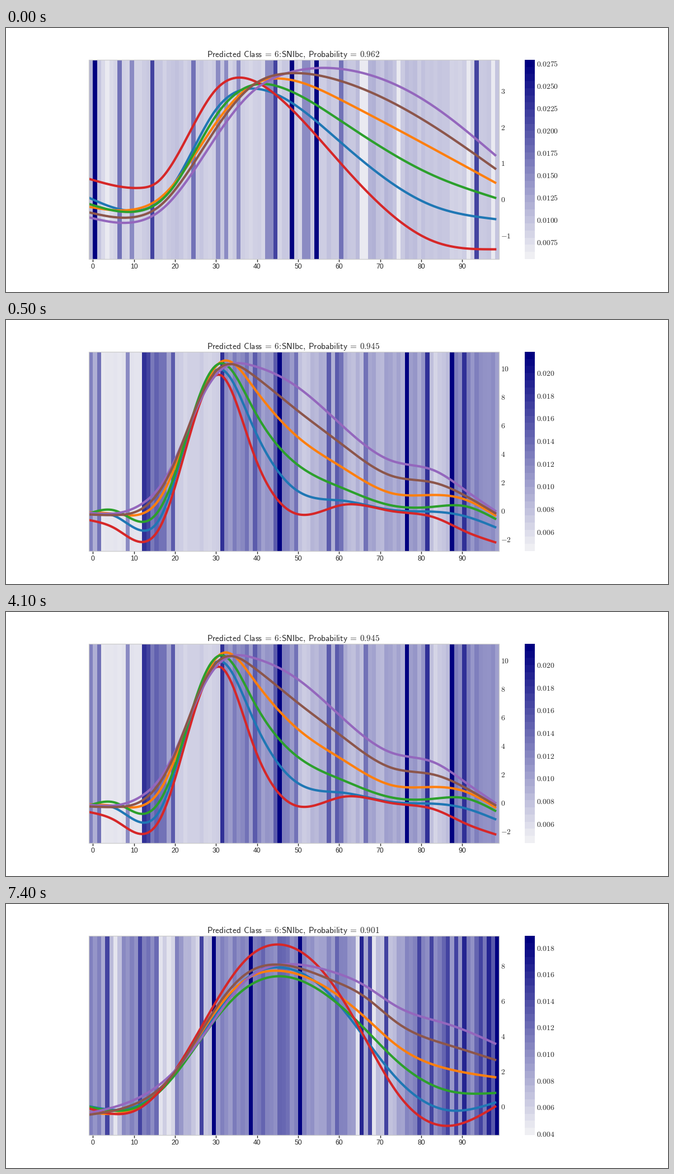
Recreate the animation shown at these times as a matplotlib script. Size 1183x473 px, loop 8000 ms.

```python
import matplotlib.pyplot as plt
import numpy as np
from matplotlib.animation import FuncAnimation
from matplotlib.colors import LinearSegmentedColormap
from matplotlib.patches import Rectangle

W, H, DPI = 1183, 473, 128
PT = 72 / DPI  # points per pixel
LEFT, RIGHT, TOP, BOTTOM = 147.9, 881.4, 56.8, 413.9
BAR_LEFT, BAR_RIGHT = 927.5, 945
COLS = 100
CELL = (RIGHT - LEFT) / COLS
INK = "#262626"
NAVY = LinearSegmentedColormap.from_list("navy", ["#efeff3", "#000080"])
STEP, STARTS = 500, [0, 500, 6500]

plt.rcParams["mathtext.fontset"] = "cm"

# values: axis range, pixel height of zero, pixels per unit
# bar: first label, label step, decimals, first height, spacing
# base: key points of the background shade; marks: shade -> standout columns
# curves: a few heights at the knots, in colour-cycle order
SCENES = [
    dict(
        prob="0.962",
        values=(range(-1, 4), 307.5, 64.8),
        bar=(0.0075, 0.0025, 4, 384, 40, 9),
        base=([0, 4, 20, 40, 60, 70, 90, 99], [20, 9, 16, 12, 16, 22, 15, 17]),
        marks={100: [1, 49, 55], 72: [15, 45, 94], 52: [7, 25, 61],
               42: [10, 31, 33, 36, 43, 44, 52, 53], 2: [4, 66, 67, 75, 92, 98]},
        knots=[149, 240, 270, 300, 375, 440, 500, 600, 760, 875],
        curves=[
            [304, 326, 313, 279, 146, 108, 127, 206, 317, 342],
            [320, 322, 308, 279, 170, 102, 91, 129, 214, 277],
            [315, 327, 314, 283, 157, 102, 109, 167, 262, 304],
            [270, 286, 276, 238, 110, 93, 135, 244, 380, 396],
            [339, 345, 331, 303, 195, 114, 81, 73, 137, 228],
            [330, 336, 322, 292, 180, 103, 81, 95, 173, 252],
        ],
    ),
    dict(
        prob="0.945",
        values=(range(-2, 11, 2), 342, 25.5),
        bar=(0.006, 0.002, 3, 380, 40.65, 8),
        base=([0, 3, 12, 14, 18, 21, 31, 33, 50, 52, 56, 64, 75, 81, 84, 87, 89, 99],
              [38, 4, 5, 58, 38, 13, 13, 40, 38, 12, 30, 22, 32, 35, 12, 20, 55, 32]),
        marks={100: [46, 77, 88], 80: [13, 32, 82, 91], 62: [20, 40, 45, 58, 60],
               52: [2, 18, 38, 50, 61, 67], 42: [9]},
        knots=[149, 195, 247, 275, 300, 350, 385, 440, 520, 600, 690, 765, 820, 875],
        curves=[
            [348, 351, 377, 355, 290, 128, 88, 187, 305, 323, 340, 343, 351, 371],
            [344, 347, 345, 319, 267, 130, 74, 117, 208, 263, 310, 313, 321, 350],
            [346, 341, 361, 338, 281, 124, 77, 155, 258, 300, 332, 334, 333, 356],
            [358, 373, 397, 371, 305, 139, 99, 232, 347, 331, 342, 353, 378, 398],
            [345, 346, 326, 298, 254, 138, 88, 81, 119, 188, 252, 269, 304, 342],
            [348, 349, 335, 305, 258, 132, 83, 97, 161, 222, 279, 291, 314, 346],
        ],
    ),
    dict(
        prob="0.901",
        values=(range(0, 9, 2), 363, 31.5),
        bar=(0.004, 0.002, 3, 412, 47.57, 8),
        base=([0, 4, 6, 8, 16, 17, 20, 21, 24, 26, 32, 46, 54, 64, 73, 76, 99],
              [38, 36, 10, 36, 45, 20, 10, 38, 25, 10, 38, 48, 34, 38, 18, 40, 52]),
        marks={100: [30, 39, 51, 99], 85: [66, 91, 97], 58: [42, 46, 60, 86, 94],
               72: [4, 12, 27, 68, 72, 80, 83, 87, 89, 95], 5: [6, 17, 19, 65, 69]},
        knots=[149, 230, 300, 375, 430, 485, 580, 640, 700, 790, 875],
        curves=[
            [362, 363, 306, 196, 133, 113, 163, 238, 314, 369, 355],
            [373, 367, 304, 191, 134, 119, 154, 201, 254, 295, 310],
            [363, 365, 308, 205, 149, 129, 168, 222, 282, 334, 338],
            [366, 370, 301, 175, 98, 72, 138, 237, 339, 397, 362],
            [374, 350, 300, 203, 135, 109, 120, 145, 184, 215, 250],
            [377, 358, 303, 186, 124, 108, 135, 165, 213, 252, 279],
        ],
    ),
]


def spline(x, y, xs):
    """Natural cubic spline through (x, y), sampled at xs."""
    x, y = np.array(x, float), np.array(y, float)
    h, n = np.diff(x), len(x)
    a, b = np.eye(n), np.zeros(n)
    for i in range(1, n - 1):
        a[i, i - 1:i + 2] = h[i - 1], 2 * (h[i - 1] + h[i]), h[i]
        b[i] = 6 * ((y[i + 1] - y[i]) / h[i] - (y[i] - y[i - 1]) / h[i - 1])
    m = np.linalg.solve(a, b)
    k = np.clip(np.searchsorted(x, xs) - 1, 0, n - 2)
    s, t, hk = x[k + 1] - xs, xs - x[k], h[k]
    return ((m[k] * s**3 + m[k + 1] * t**3) / (6 * hk)
            + (y[k] / hk - m[k] * hk / 6) * s
            + (y[k + 1] / hk - m[k + 1] * hk / 6) * t)


def shades(base, marks):
    """Background profile with a little seeded noise and standout columns."""
    rng = np.random.default_rng(4)
    level = np.interp(np.arange(COLS), *base) * rng.uniform(0.75, 1.25, COLS)
    for shade, cols in marks.items():
        level[cols] = shade
    return level / 100


fig = plt.figure(figsize=(W / DPI, H / DPI), dpi=DPI, facecolor="white")
ax = fig.add_axes([0, 0, 1, 1])
ax.set_xlim(0, W)
ax.set_ylim(H, 0)
ax.axis("off")


def text(x, y, s, size, ha="center", **style):
    return ax.text(x, y, s, fontsize=size * PT, ha=ha, va="baseline", color=INK, **style)


def number(x, y, s):
    return text(x, y + 4.7, f"${s}$", 13.6, "left")


def title(prob):
    gap, thin = r"\hspace{0.42}", r"\hspace{0.22}"
    s = (f"Predicted{gap}Class{thin}={thin}6" + r"\!:\!"
         + f"SNIbc,{thin}Probability{thin}={thin}{prob}")
    return text(513.5, 51.5, r"$\mathsf{" + s + "}$", 15.2)


def build(scene):
    """Create every artist that belongs to one scene."""
    edges = LEFT + CELL * np.arange(COLS + 1)
    parts = [ax.pcolormesh(edges, [TOP, BOTTOM],
                           shades(scene["base"], scene["marks"])[None],
                           cmap=NAVY, vmin=0, vmax=1, zorder=1)]
    xs = np.linspace(LEFT, 874.2, 200)
    for i, ys in enumerate(scene["curves"]):
        line, = ax.plot(xs, spline(scene["knots"], ys, xs) + 0.5, color=f"C{i}",
                        lw=4.17 * PT, zorder=2)
        line.set_clip_path(frame)
        parts.append(line)
    values, zero, unit = scene["values"]
    parts += [number(883.8, zero - unit * v, v) for v in values]
    first, step, digits, y, dy, count = scene["bar"]
    parts += [number(947.8, y - dy * k, f"{first + step * k:.{digits}f}")
              for k in range(count)]
    return parts + [title(scene["prob"])]


frame = ax.add_patch(Rectangle((LEFT, TOP), RIGHT - LEFT, BOTTOM - TOP, fill=False,
                               ec="#cccccc", lw=1.3 * PT, zorder=3))

bands = 28
ax.pcolormesh([BAR_LEFT, BAR_RIGHT], np.linspace(BOTTOM, TOP, bands + 1),
              np.linspace(0, 1, bands)[:, None], cmap=NAVY, vmin=0, vmax=1)

for v in range(0, 100, 10):
    x = LEFT + CELL * (v + 1)
    ax.plot([x, x], [BOTTOM + 0.5, BOTTOM + 5], color=INK, lw=1.4 * PT,
            solid_capstyle="butt")
    text(x, 431.3, str(v), 12.3, family="Liberation Sans")

scenes = [build(s) for s in SCENES]


def update(i):
    now = np.searchsorted(STARTS, i * STEP, side="right") - 1
    for k, parts in enumerate(scenes):
        for part in parts:
            part.set_visible(k == now)
    return []


anim = FuncAnimation(fig, update, frames=16, interval=STEP, init_func=lambda: update(0),
                     repeat=True, repeat_delay=0, blit=False)
plt.show()
```
